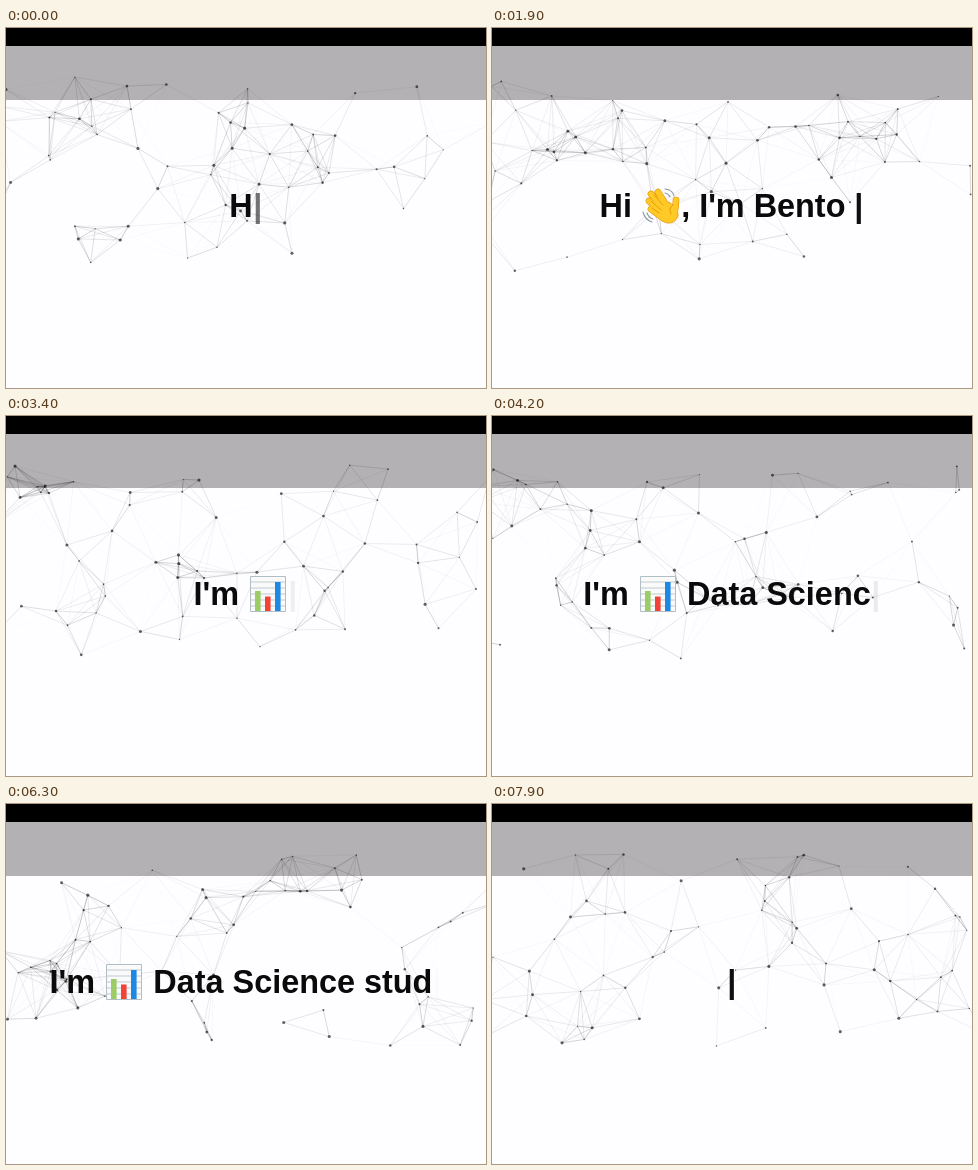
These frames come from a looping animation (480x360 px, 8000 ms). An HTML page with a canvas:

```html
<!DOCTYPE html>
<html lang="en">
<head>
<meta charset="utf-8">
<title>Typed greeting</title>
<style>
  html, body { margin: 0; width: 100%; height: 100%; overflow: hidden; background: #fefdff; }
  #stage { position: relative; width: 480px; height: 360px; overflow: hidden; }
  .top { position: absolute; inset: 0 0 auto; height: 72px; background: #b3b1b3; border-top: 18px solid #000; box-sizing: border-box; }
  canvas { position: absolute; left: 0; top: 48px; }
  #line {
    position: absolute; left: 0; top: 158px; width: 479px; margin: 0;
    display: flex; justify-content: center; align-items: baseline;
    font: bold 32.4px/40px "Liberation Sans", Arial, sans-serif;
    white-space: pre; color: #0a0a0a;
  }
  #line svg { flex: none; width: 40.3px; height: 1px; overflow: visible; }
  #cursor { color: #000; animation: blink 1s -635ms infinite; }
  @keyframes blink { 0%, 100% { opacity: 0; } 50% { opacity: 1; } }
</style>
</head>
<body>
<div id="stage">
  <div class="top"></div>
  <canvas id="net" width="480" height="196"></canvas>
  <p id="line">
    <span id="head"></span>
    <svg id="hand"><g transform="translate(0 -29)" fill="none" stroke-linecap="round" stroke-linejoin="round">
      <defs><path id="fingers" d="M27 21L17 5M24 23L10 7M22 27L8 14M22 31L10 22M33 28Q35 20 35 13"/></defs>
      <use href="#fingers" stroke="#e59600" stroke-width="6.600"/>
      <path d="M17 22L28 15Q38 22 37 29Q34 37 26 36Q19 34 14 26Z" fill="#ffca28" stroke="#e59600" stroke-width=".8"/>
      <use href="#fingers" stroke="#ffca28" stroke-width="5.400"/>
      <path d="M13 8L22 18M10 14L20 23M11 21L18 26M32 18Q27 21 30 27" stroke="#e59600" stroke-width=".9"/>
      <path d="M24 2Q32 3 33 9M24 6Q28 7 29 10M2 25Q4 33 11 35M6 26Q8 31 12 32" stroke="#8d9aa0" stroke-width="1.1"/>
    </g></svg>
    <svg id="chart"><g transform="translate(2 -28)">
      <path d="M.5 .5h35v35h-35z" fill="#fafafa" stroke="#b0bec5"/>
      <path d="M1 6h34m-34 6h34m-34 6h34m-34 6h34m-34 6h34" stroke="#b8c4ca" stroke-width=".9"/>
      <path d="M7.800 35v-20" stroke="#9ccc65" stroke-width="5.600"/>
      <path d="M17.800 35v-14.500" stroke="#f44336" stroke-width="5.600"/>
      <path d="M27.800 35v-29" stroke="#1e88e5" stroke-width="5.600"/>
    </g></svg>
    <span id="tail"></span>
    <span id="cursor">|</span>
  </p>
</div>
<script>
  const LOOP = 8000, TYPE = 62, ERASE = 65;
  const DOTS = 64, REACH = 75, SPEED = 55;
  const WIDTH = 480, HEIGHT = 196, MARGIN = 15;
  const $ = id => document.getElementById(id);
  const ctx = $('net').getContext('2d');

  const phrases = [
    { head: 'Hi ', icon: 'hand', tail: ', I\'m Bento ', start: -TYPE, erase: 2050 },
    { head: 'I\'m ', icon: 'chart', tail: ' Data Science student ', start: 3090, erase: 6030 }
  ];

  let seed = 2024;
  const rand = () => (seed = seed * 16807 % 2147483647) / 2147483647;
  const between = (lo, hi) => lo + (hi - lo) * rand();

  const dots = Array.from({ length: DOTS }, () => ({
    x: between(-MARGIN, WIDTH + MARGIN),
    y: between(0, HEIGHT),
    vx: between(-SPEED, SPEED),
    vy: between(-SPEED, SPEED),
    r: between(.5, 1.6)
  }));

  // Bounce a straight path between two walls
  function bounce(p, lo, hi) {
    const span = hi - lo;
    const q = (((p - lo) % (2 * span)) + 2 * span) % (2 * span);
    return lo + (q > span ? 2 * span - q : q);
  }

  function drawNet(t) {
    const s = t / 1000;
    const pts = dots.map(d => ({
      x: bounce(d.x + d.vx * s, -MARGIN, WIDTH + MARGIN),
      y: bounce(d.y + d.vy * s, 1, HEIGHT - 1),
      r: d.r
    }));
    ctx.clearRect(0, 0, WIDTH, HEIGHT);
    ctx.lineWidth = .6;
    pts.forEach((a, i) => {
      for (const b of pts.slice(i + 1)) {
        const gap = Math.hypot(a.x - b.x, a.y - b.y);
        if (gap >= REACH) continue;
        ctx.strokeStyle = `rgba(0,0,0,${.4 * (1 - gap / REACH)})`;
        ctx.beginPath();
        ctx.moveTo(a.x, a.y);
        ctx.lineTo(b.x, b.y);
        ctx.stroke();
      }
    });
    ctx.fillStyle = 'rgba(0,0,0,.6)';
    for (const p of pts) {
      ctx.beginPath();
      ctx.arc(p.x, p.y, p.r, 0, 2 * Math.PI);
      ctx.fill();
    }
  }

  function drawText(t) {
    const p = phrases[t < phrases[1].start ? 0 : 1];
    const full = p.head.length + 1 + p.tail.length;
    const typed = Math.min(full, Math.floor((t - p.start) / TYPE));
    const erased = Math.max(0, Math.floor((t - p.erase) / ERASE));
    const n = Math.max(0, typed - erased);
    $('head').textContent = p.head.slice(0, n);
    $('tail').textContent = p.tail.slice(0, Math.max(0, n - p.head.length - 1));
    for (const id of ['hand', 'chart'])
      $(id).style.display = id === p.icon && n > p.head.length ? 'block' : 'none';
  }

  let origin;
  function frame(now) {
    origin ??= now;
    const t = (now - origin) % LOOP;
    drawNet(t);
    drawText(t);
    requestAnimationFrame(frame);
  }
  requestAnimationFrame(frame);
</script>
</body>
</html>
```
